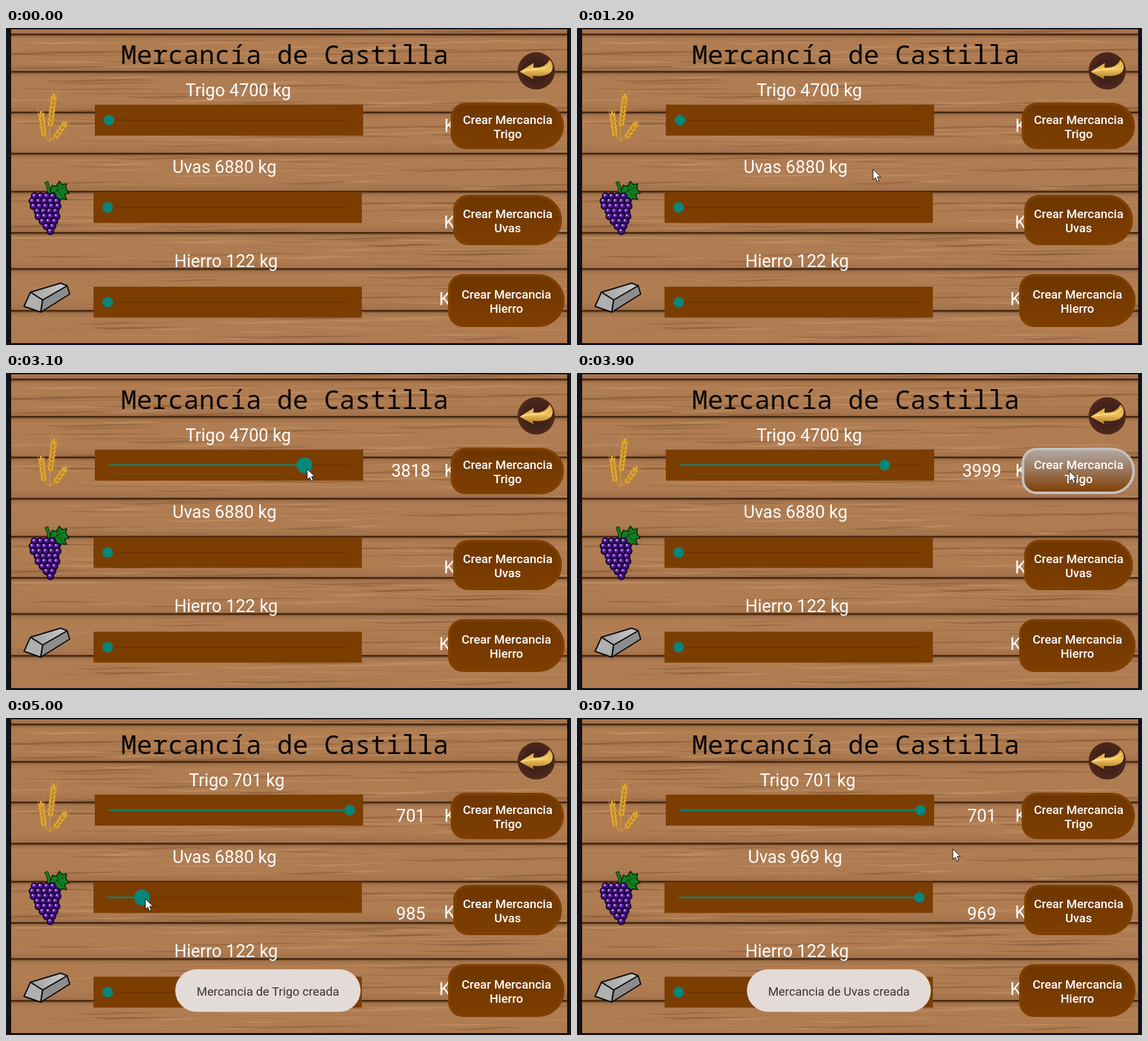
These frames come from a looping animation (878x492 px, 7.2 s). An HTML page:

```html
<!DOCTYPE html>
<html lang="es">
<head>
<meta charset="utf-8">
<title>Mercancía de Castilla</title>
<style>
html, body { margin: 0; width: 100%; height: 100%; overflow: hidden; background: #121217; }
svg { display: block; width: 878px; height: 492px; }
text { font-family: Roboto, sans-serif; text-anchor: middle; }
.title { font: 40.4px "Noto Sans Mono", monospace; fill: #080503; }
.label { font-size: 27px; fill: #fff; }
.unit { text-anchor: start; }
.caption { font-size: 18.9px; font-weight: 500; fill: #fff; }
.toast { font-size: 18.8px; fill: #3b3331; }
</style>
</head>
<body>
<svg id="stage" viewBox="0 0 878 492">
  <defs>
    <linearGradient id="plank" x2="0" y2="1">
      <stop offset="0" stop-color="#9c6c45"/><stop offset=".16" stop-color="#b07d53"/>
      <stop offset=".75" stop-color="#af7c52"/><stop offset="1" stop-color="#a27049"/>
    </linearGradient>
    <linearGradient id="idle" x2="0" y2="1">
      <stop offset="0" stop-color="#6d3600"/><stop offset=".6" stop-color="#783b00"/><stop offset="1" stop-color="#7d3e00"/>
    </linearGradient>
    <linearGradient id="pressed" x2="0" y2="1">
      <stop offset="0" stop-color="#b3aaa5"/><stop offset=".5" stop-color="#9a7458"/><stop offset="1" stop-color="#7d3e00"/>
    </linearGradient>
    <linearGradient id="gold" x2="0" y2="1">
      <stop offset="0" stop-color="#c98d30"/><stop offset=".5" stop-color="#f0c45e"/><stop offset="1" stop-color="#a86c1c"/>
    </linearGradient>
    <radialGradient id="disc">
      <stop offset=".6" stop-color="#41221a"/><stop offset="1" stop-color="#50291c"/>
    </radialGradient>
    <radialGradient id="grape" cx=".4" cy=".35">
      <stop offset="0" stop-color="#9a55dc"/><stop offset=".4" stop-color="#6420ad"/><stop offset="1" stop-color="#2f0c62"/>
    </radialGradient>
    <linearGradient id="steel">
      <stop offset="0" stop-color="#a0a0a0"/><stop offset="1" stop-color="#cbcbcb"/>
    </linearGradient>
    <clipPath id="wall"><rect x="8" y="2" width="864" height="487"/></clipPath>
  </defs>
</svg>
<script>
const LOOP = 7200, STEP = 100, TEAL = '#07867a';
const stage = document.getElementById('stage');

function add(parent, tag, attrs = {}, content) {
  const node = document.createElementNS('http://www.w3.org/2000/svg', tag);
  set(node, attrs);
  if (content !== undefined) node.textContent = content;
  parent.append(node);
  return node;
}
function set(node, attrs) {
  for (const key in attrs) node.setAttribute(key, attrs[key]);
}

let seed = 11;
function random(min, max) {
  seed = (seed * 16807) % 2147483647;
  return min + (max - min) * seed / 2147483647;
}

function drawWall() {
  const wall = add(stage, 'g', { 'clip-path': 'url(#wall)' });
  const seams = [-50, 10, 68, 131, 195, 254, 318, 374, 439, 502];
  for (let i = 0; i < seams.length - 1; i++) {
    const top = seams[i], height = seams[i + 1] - top;
    add(wall, 'rect', { x: 8, y: top, width: 864, height, fill: 'url(#plank)' });
    // long tapered streaks, light and dark
    for (let n = 0; n < 46; n++) {
      const x = random(-80, 820), y = top + random(6, height - 5);
      const len = random(80, 260), bend = random(-7, 7), thick = random(1, 3);
      add(wall, 'path', {
        d: `M${x} ${y}c${len * .3} ${bend} ${len * .6} ${-bend} ${len} ${bend * .4}` +
           `c${-len * .4} ${-bend + thick} ${-len * .7} ${bend + thick} ${-len} ${-bend * .4}z`,
        fill: n % 2 ? '#835835' : '#c6966a', opacity: .5
      });
    }
    add(wall, 'rect', { x: 8, y: top - 1.3, width: 864, height: 2.6, fill: '#40240f' });
    add(wall, 'rect', { x: 8, y: top + 1.3, width: 864, height: 1.5, fill: '#76502f', opacity: .7 });
  }
}

function drawBack() {
  add(stage, 'circle', { cx: 824, cy: 66.5, r: 29, fill: 'url(#disc)' });
  add(stage, 'path', {
    d: 'M797 68L821 53L820 61Q839 62 844 48Q854 56 848 68Q840 77 819 75L821 81Z',
    fill: 'url(#gold)', stroke: '#2c140c', 'stroke-width': 1
  });
  add(stage, 'path', { d: 'M802 67L818 64Q840 66 846 54', fill: 'none', stroke: '#ffe796', 'stroke-width': 1.4 });
}

function drawWheat() {
  const ears = [[69, 149, 74, 109, 7], [59, 165, 55, 136, 6], [78, 168, 90, 151, 4]];
  add(stage, 'path', {
    d: 'M69 176Q66 160 69 147M68 176Q62 172 59 163M69 175Q73 172 79 166',
    fill: 'none', stroke: '#d9a32c', 'stroke-width': 1.1
  });
  for (const [x1, y1, x2, y2, rows] of ears) {
    const length = Math.hypot(x2 - x1, y2 - y1), angle = Math.atan2(x2 - x1, y1 - y2) * 180 / Math.PI;
    const ear = add(stage, 'g', { transform: `translate(${x1} ${y1}) rotate(${angle})` });
    for (let i = 0; i < rows; i++) {
      const y = -length * i / (rows - 1);
      for (const side of [-1, 1]) {
        add(ear, 'path', { d: `M${side * 3} ${y}L${side * 5} ${y - 15}`, stroke: '#cf9b35', 'stroke-width': .5 });
        add(ear, 'ellipse', {
          cx: side * 2.5, cy: y, rx: 1.8, ry: 4.2, transform: `rotate(${side * 22} ${side * 2.5} ${y})`,
          fill: '#e2ac36', stroke: '#b0781c', 'stroke-width': .5
        });
      }
    }
    add(ear, 'ellipse', { cx: 0, cy: -length - 4, rx: 1.6, ry: 4, fill: '#e2ac36' });
  }
}

function drawGrapes() {
  add(stage, 'path', { d: 'M65 260Q65 247 60 240L65 238Q69 246 70 258Z', fill: '#1f7a1c', stroke: '#0a2806' });
  add(stage, 'path', {
    d: 'M69 252L72 244L78 246L83 238L87 243L94 242L93 249L98 256L91 258L94 266L86 265L83 271L77 263L69 263Z',
    fill: '#137d22', stroke: '#062408', 'stroke-width': 1.6
  });
  add(stage, 'path', { d: 'M71 257L91 247M78 254L83 244M80 253L89 262', stroke: '#07400f', fill: 'none' });
  [4, 5, 5, 4, 4, 3, 2, 1].forEach((count, row) => {
    for (let i = 0; i < count; i++) {
      const cx = 58.5 + row * 1.5 + (i - (count - 1) / 2) * 9.4, cy = 261 + row * 7.8;
      add(stage, 'circle', { cx, cy, r: 5.2, fill: 'url(#grape)', stroke: '#14042a', 'stroke-width': 1.6 });
      add(stage, 'circle', { cx: cx - 1.5, cy: cy - 1.8, r: 1.2, fill: '#d4b0f4' });
    }
  });
}

function drawIngot() {
  const faces = [
    ['28 432 38 410 57 422 54 441', '#b0b0b0'],
    ['54 441 57 422 95 400 99 413', '#8d8d8d'],
    ['38 410 85 396 95 400 57 422', 'url(#steel)']
  ];
  for (const [points, fill] of faces)
    add(stage, 'polygon', { points, fill, stroke: '#0c0c0c', 'stroke-width': 2, 'stroke-linejoin': 'round' });
}

function buttonPath(x, y, w, h, left) {
  const r = h / 2;
  return `M${x + left} ${y}H${x + w - r}a${r} ${r} 0 0 1 0 ${h}H${x + left}` +
         `a${left} ${left} 0 0 1 ${-left} ${-left}V${y + left}a${left} ${left} 0 0 1 ${left} ${-left}z`;
}

function makeRow(o) {
  add(stage, 'rect', { x: o.box[0], y: o.box[1], width: 417, height: 48, fill: '#7c3d00' });
  const start = o.box[0] + 22, y = o.trackY;
  add(stage, 'path', { d: `M${start} ${y}h374`, stroke: '#673302', 'stroke-width': 1.5 });
  const fill = add(stage, 'path', { stroke: TEAL, 'stroke-width': 2.6 });
  const thumb = add(stage, 'circle', { cy: y, fill: TEAL });
  const label = add(stage, 'text', { y: o.labelY, class: 'label' });
  const value = add(stage, 'text', { x: 629, y: o.valueY, class: 'label' });
  add(stage, 'text', { x: o.unit[0], y: o.unit[1], class: 'label unit' }, 'Kg');
  const [bx, by, bw, bh] = o.button;
  const button = add(stage, 'path', { d: buttonPath(bx + 2, by + 2, bw - 4, bh - 4, 21), 'stroke-width': 4 });
  const middle = o.captionX;
  add(stage, 'text', { x: middle, y: by + bh / 2 - 3.2, class: 'caption' }, 'Crear Mercancia');
  add(stage, 'text', { x: middle, y: by + bh / 2 + 18.8, class: 'caption' }, o.name);

  return ({ stock, amount, shown, dragging, down }) => {
    const x = start + 374 * Math.min(1, amount / stock);
    set(fill, { d: `M${start} ${y}H${x}` });
    set(thumb, { cx: x, r: dragging ? 12.3 : 8.2 });
    set(label, { x: stock < 1000 ? o.labelX[1] : o.labelX[0] });
    label.textContent = `${o.name} ${stock} kg`;
    value.textContent = shown ? Math.round(amount) : '';
    set(button, down ? { fill: 'url(#pressed)', stroke: '#c4c0be' } : { fill: 'url(#idle)', stroke: '#7f3f00' });
  };
}

function makeToast(name, x, width) {
  const toast = add(stage, 'g');
  add(toast, 'rect', { x, y: 390, width, height: 66, rx: 33, fill: '#e3dbd7' });
  add(toast, 'text', { x: 407, y: 430.5, class: 'toast' }, `Mercancia de ${name} creada`);
  return toast;
}

// Linear reading of [time, ...values] steps
function track(steps, t) {
  const next = steps.findIndex(step => step[0] > t);
  if (next === 0) return steps[0].slice(1);
  if (next < 0) return steps[steps.length - 1].slice(1);
  const a = steps[next - 1], b = steps[next], k = (t - a[0]) / (b[0] - a[0]);
  return a.slice(1).map((v, i) => v + (b[i + 1] - v) * k);
}

const pointerSteps = [
  [200, 872, 400], [600, 735, 311], [800, 700, 296], [1300, 400, 200], [1700, 185, 142], [1900, 159, 135],
  [2100, 159, 135], [2200, 165, 143], [3100, 468, 149], [3300, 483, 150], [3400, 483, 150], [3800, 765, 152],
  [4000, 765, 152], [4400, 441, 243], [4800, 163, 277], [4900, 163, 280], [5500, 484, 283], [5600, 484, 283],
  [5800, 761, 289], [6200, 761, 289], [6900, 624, 198], [7000, 624, 198], [7100, 584, 203]
];
const wheatSteps = [[2200, 0], [3100, 3818], [3300, 3999]];
const grapeSteps = [[4900, 0], [5500, 5911]];
const wheatToastSteps = [[4300, 0], [4400, .35], [4600, 1], [6200, 1], [6400, 0]];
const grapeToastSteps = [[6400, 0], [6500, .35], [6700, 1]];

drawWall();
add(stage, 'text', { x: 433.3, y: 56, class: 'title' }, 'Mercancía de Castilla');
drawBack();
drawWheat();
drawGrapes();
drawIngot();
const wheat = makeRow({
  name: 'Trigo', box: [138, 119], trackY: 143, labelX: [361, 358.5], labelY: 105.5, valueY: 161,
  unit: [681, 161], button: [691, 116, 176, 72], captionX: 779.5
});
const grapes = makeRow({
  name: 'Uvas', box: [136, 254.5], trackY: 278.5, labelX: [339.5, 339], labelY: 225, valueY: 313,
  unit: [680.5, 311], button: [695, 259, 169, 78], captionX: 779.5
});
const iron = makeRow({
  name: 'Hierro', box: [136, 401.5], trackY: 425.5, labelX: [342, 342], labelY: 371, valueY: 435,
  unit: [673, 429.5], button: [687, 382, 181, 82], captionX: 777.5
});
const wheatToast = makeToast('Trigo', 263, 288);
const grapeToast = makeToast('Uvas', 264, 286);
const pointer = add(stage, 'path', {
  d: 'M0 0V16.5L3.8 13L6.4 19L9.4 17.7L6.8 11.8H12Z', fill: '#fff', stroke: '#111', 'stroke-width': 1
});

const within = (t, from, to) => t >= from && t < to;

function draw(t) {
  const wheatMade = t >= 4000, grapesMade = t >= 6000;
  wheat({
    stock: wheatMade ? 701 : 4700, amount: wheatMade ? 701 : track(wheatSteps, t)[0],
    shown: t > 2200, dragging: within(t, 2200, 3400), down: within(t, 3800, 4000)
  });
  grapes({
    stock: grapesMade ? 969 : 6880, amount: grapesMade ? 969 : track(grapeSteps, t)[0],
    shown: t > 4900, dragging: within(t, 4900, 5600), down: within(t, 5900, 6000)
  });
  iron({ stock: 122, amount: 0 });
  set(wheatToast, { opacity: track(wheatToastSteps, t)[0] });
  set(grapeToast, { opacity: track(grapeToastSteps, t)[0] });
  const [x, y] = track(pointerSteps, t);
  set(pointer, { transform: `translate(${x} ${y})`, opacity: t < 200 ? 0 : 1 });
}

const begin = performance.now();
function tick() {
  const t = (performance.now() - begin) % LOOP;
  draw(Math.floor(t / STEP) * STEP);
  requestAnimationFrame(tick);
}
tick();
</script>
</body>
</html>
```
